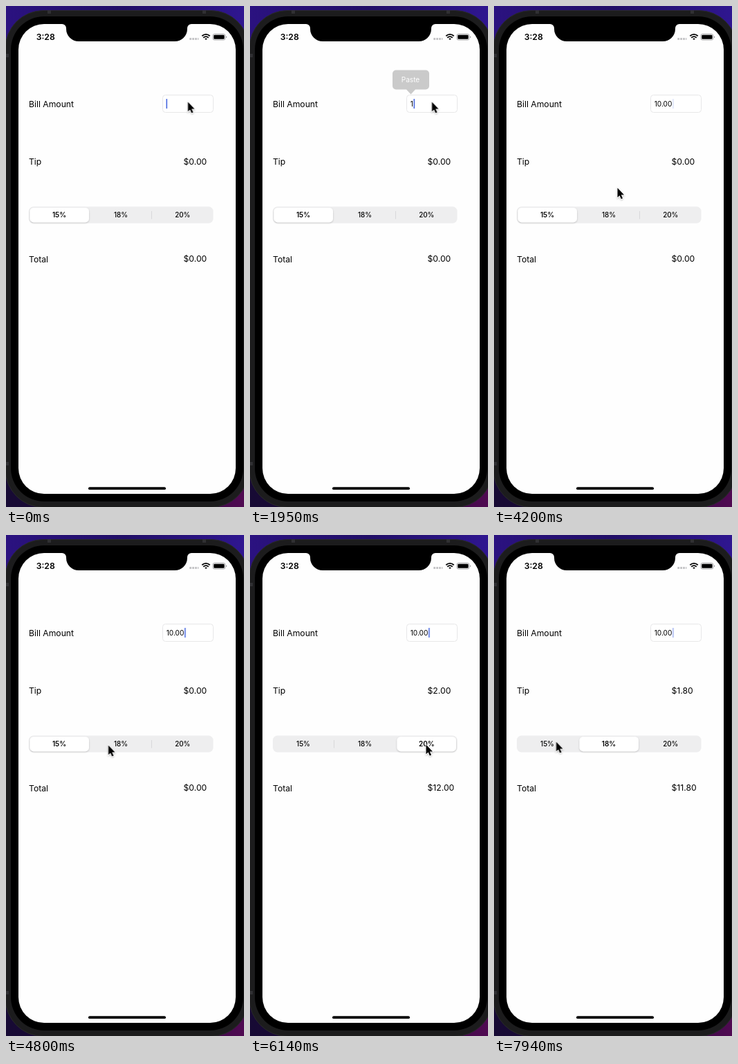
An HTML page for the animation above (8000 ms loop, 344 by 723 pixels).

```html
<!DOCTYPE html>
<html lang="en">
<head>
<meta charset="utf-8">
<title>Tip calculator</title>
<style>
html, body { margin: 0; width: 100%; height: 100%; overflow: hidden; background: #1a0d45; }
svg { display: block; width: 344px; height: 723px; }
text { font-family: Inter, Roboto, sans-serif; font-size: 12.2px; fill: #000; }
.clock { font-weight: 600; }
.small { font-size: 10.1px; }
.seg text { font-size: 9.9px; font-weight: 500; text-anchor: middle; }

/* Every track shares one 8 s loop; 1.875% is a 150 ms tick. */
.track, .seg text, .typed tspan { animation: 8s step-end infinite; }

.menu { animation-name: menu; }
@keyframes menu {
  0% { opacity: 0 } 7.5% { opacity: .35 } 9.375% { opacity: .8 } 11.25% { opacity: 1 }
  22.5% { opacity: .6 } 24.375% { opacity: .2 } 26.25%, 100% { opacity: 0 }
}

.typed .one { animation-name: one; }
.typed .zero { animation-name: zero; }
.typed .dot { animation-name: dot; }
.typed .dime { animation-name: dime; }
.typed .cent { animation-name: cent; }
@keyframes one { 0% { fill-opacity: 0 } 22.5%, 100% { fill-opacity: 1 } }
@keyframes zero { 0% { fill-opacity: 0 } 26.25%, 100% { fill-opacity: 1 } }
@keyframes dot { 0% { fill-opacity: 0 } 31.875%, 100% { fill-opacity: 1 } }
@keyframes dime { 0% { fill-opacity: 0 } 41.25%, 100% { fill-opacity: 1 } }
@keyframes cent { 0% { fill-opacity: 0 } 43.125%, 100% { fill-opacity: 1 } }

.caret { animation-name: caret; }
@keyframes caret {
  0% { transform: none }
  22.5% { transform: translateX(5px) }
  26.25% { transform: translateX(11px) }
  31.875% { transform: translateX(13.5px) }
  41.25% { transform: translateX(20px) }
  43.125%, 100% { transform: translateX(26.6px) }
}
.blink { animation-name: blink; }
@keyframes blink {
  0% { opacity: 1 } 7.5% { opacity: .3 } 9.375% { opacity: .5 } 11.25% { opacity: 1 }
  15% { opacity: .3 } 16.875% { opacity: 1 }
  31.875% { opacity: .6 } 33.75% { opacity: 1 }
  52.5% { opacity: .2 } 54.375% { opacity: 1 }
  65.625% { opacity: .2 } 67.5% { opacity: 1 }
  78.75% { opacity: .2 } 80.625% { opacity: 1 }
  91.75% { opacity: .3 } 93.625% { opacity: 1 }
  99.25%, 100% { opacity: .5 }
}

.none { animation-name: none-due; }
.mid { animation-name: mid-due; }
.high { animation-name: high-due; }
@keyframes none-due { 0% { opacity: 1 } 61.875%, 100% { opacity: 0 } }
@keyframes mid-due {
  0% { opacity: 0 } 61.875% { opacity: 1 } 69.375% { opacity: 0 } 84.25%, 100% { opacity: 1 }
}
@keyframes high-due { 0% { opacity: 0 } 69.375% { opacity: 1 } 84.25%, 100% { opacity: 0 } }

.thumb { animation-name: thumb; }
@keyframes thumb {
  0% { transform: none }
  61.875% { transform: translateX(28px) }
  63.75% { transform: translateX(82px) }
  65.625% { transform: translateX(89px) }
  69.375% { transform: translateX(109px) }
  71.25% { transform: translateX(169px) }
  73.125% { transform: translateX(178px) }
  84.25% { transform: translateX(117.5px) }
  86.125% { transform: translateX(92px) }
  88%, 100% { transform: translateX(89px) }
}
.seg .low-label { animation-name: low-label; }
.seg .mid-label { animation-name: mid-label; }
.seg .high-label { animation-name: high-label; }
@keyframes low-label { 0% { font-weight: 600 } 61.875%, 100% { font-weight: 500 } }
@keyframes mid-label {
  0% { font-weight: 500 } 61.875% { font-weight: 600 } 71.25% { font-weight: 500 } 84.25%, 100% { font-weight: 600 }
}
@keyframes high-label {
  0% { font-weight: 500 } 71.25% { font-weight: 600 } 84.25%, 100% { font-weight: 500 }
}
.left-rule { animation-name: left-rule; }
.right-rule { animation-name: right-rule; }
@keyframes left-rule {
  0% { opacity: 0 } 69.375% { opacity: .1 } 71.25% { opacity: .6 } 73.125% { opacity: 1 }
  84.25% { opacity: .6 } 86.125%, 100% { opacity: 0 }
}
@keyframes right-rule { 0% { opacity: 1 } 61.875% { opacity: .6 } 63.75%, 100% { opacity: 0 } }

.pointer { animation-name: pointer; }
@keyframes pointer {
  0% { transform: translate(262.5px, 138px) }
  48.75% { transform: translate(255px, 149px) }
  50.625% { transform: translate(224px, 196px) }
  52.5% { transform: translate(178px, 262px) }
  54.375% { transform: translate(141px, 304px) }
  56.25% { transform: translate(129px, 311px) }
  58.125% { transform: translate(137px, 308px) }
  60% { transform: translate(147.5px, 303px) }
  65.625% { transform: translate(183px, 303px) }
  67.5% { transform: translate(238px, 302px) }
  69.375% { transform: translate(257.5px, 302.5px) }
  75% { transform: translate(254px, 302px) }
  76.875% { transform: translate(238px, 299px) }
  78.75% { transform: translate(210px, 295px) }
  80.625% { transform: translate(184px, 292px) }
  82.375% { transform: translate(169.5px, 292px) }
  91.75% { transform: translate(160px, 294px) }
  93.625% { transform: translate(134px, 301px) }
  95.5% { transform: translate(107px, 304px) }
  97.375% { transform: translate(94px, 301px) }
  99.25%, 100% { transform: translate(89.5px, 298px) }
}
</style>
</head>
<body>
<svg viewBox="0 0 344 723">
  <defs>
    <linearGradient id="sky">
      <stop stop-color="#2b1280"/>
      <stop offset=".5" stop-color="#210e66"/>
      <stop offset="1" stop-color="#2f1690"/>
    </linearGradient>
    <linearGradient id="ground">
      <stop stop-color="#170a34"/>
      <stop offset=".6" stop-color="#1f0a38"/>
      <stop offset="1" stop-color="#500a52"/>
    </linearGradient>
    <filter id="lift" x="-10%" y="-20%" width="120%" height="150%">
      <feDropShadow dx="0" dy="1" stdDeviation="1" flood-opacity=".22"/>
    </filter>
    <filter id="drop" x="-30%" y="-20%" width="170%" height="150%">
      <feDropShadow dx="0" dy="1" stdDeviation=".8" flood-opacity=".3"/>
    </filter>
  </defs>

  <!-- wallpaper and phone -->
  <rect width="344" height="362" fill="url(#sky)"/>
  <rect y="361" width="344" height="362" fill="url(#ground)"/>
  <rect x="-1" y="6.5" width="352" height="717" rx="55" fill="#1c1c1d" stroke="#29292b"/>
  <g fill="#303033">
    <rect x="60" y="6" width="5" height="5"/>
    <rect x="284" y="6" width="5" height="5"/>
    <rect y="69" width="4" height="5"/>
    <rect y="658" width="4" height="5"/>
  </g>
  <rect x="7" y="15" width="336" height="700" rx="48"/>
  <rect x="18" y="26" width="314" height="678" rx="37" fill="#fefefe"/>
  <path d="M81 25V26A6 6 0 0 1 87 32V33A18 18 0 0 0 105 51H244A18 18 0 0 0 262 33V32A6 6 0 0 1 268 26V25Z"/>
  <rect x="119" y="694.300" width="112" height="3.800" rx="1.900"/>

  <!-- status bar -->
  <text class="clock" x="43.700" y="49">3:28</text>
  <path d="M265.300 47.500h13" stroke="#c4c4c6" stroke-width="2.800" stroke-dasharray="2.800 1.100"/>
  <g fill="none" stroke="#000" stroke-width="1.800">
    <path d="M283.300 43.300Q289 38.400 294.700 43.300M285.300 45.700Q289 42.500 292.700 45.700"/>
    <path d="M287.200 47.200Q289 45.800 290.800 47.200L289 49Z" fill="#000" stroke="none"/>
  </g>
  <rect x="298.900" y="40.400" width="18" height="8.700" rx="2.500" fill="none" stroke="#a0a0a2" stroke-width=".9"/>
  <rect x="300.200" y="41.700" width="15.400" height="6.100" rx="1.300"/>
  <path d="M318 43.400q1.300 .4 1.300 1.400t-1.300 1.400Z" fill="#a0a0a2"/>

  <!-- labels and results -->
  <text x="33" y="145.800">Bill Amount</text>
  <text x="33" y="229.200">Tip</text>
  <text x="33" y="369.800">Total</text>
  <g class="track none">
    <text x="256.500" y="229">$0.00</text>
    <text x="256.500" y="369.200">$0.00</text>
  </g>
  <g class="track mid">
    <text x="256.500" y="229">$1.80</text>
    <text x="256.500" y="369.200">$11.80</text>
  </g>
  <g class="track high">
    <text x="256.500" y="229">$2.00</text>
    <text x="256.500" y="369.200">$12.00</text>
  </g>

  <!-- bill field -->
  <rect x="226.500" y="128.500" width="73" height="25" rx="4" fill="#fff" stroke="#e7e7e8"/>
  <text class="small typed" x="231.700" y="144.800"><tspan class="one">1</tspan><tspan class="zero">0</tspan><tspan class="dot">.</tspan><tspan class="dime">0</tspan><tspan class="cent">0</tspan></text>
  <g class="track caret">
    <rect class="track blink" x="231.500" y="134" width="1.600" height="14" rx=".6" fill="#4868e0"/>
  </g>
  <g class="track menu">
    <path d="M211 92.500H254a5 5 0 0 1 5 5V115.500a5 5 0 0 1-5 5H239L232.500 127.500L226 120.500H211a5 5 0 0 1-5-5V97.500a5 5 0 0 1 5-5Z"/>
    <text class="small" x="218.700" y="110.300" style="fill:#fff">Paste</text>
  </g>

  <!-- tip rates -->
  <g class="seg">
    <rect x="33" y="289.500" width="266.500" height="24" rx="6.500" fill="#eeeeef"/>
    <rect class="track left-rule" x="121" y="296" width="1" height="11.500" fill="#d8d8da"/>
    <rect class="track right-rule" x="210" y="296" width="1" height="11.500" fill="#d8d8da"/>
    <g class="track thumb">
      <rect x="34.500" y="291" width="85.500" height="21.200" rx="5.500" fill="#fff" filter="url(#lift)"/>
    </g>
    <text class="low-label" x="77" y="305">15%</text>
    <text class="mid-label" x="166" y="305">18%</text>
    <text class="high-label" x="255.300" y="305">20%</text>
  </g>

  <g class="track pointer">
    <path d="M.5 .5V14.300L3.600 11.400L5.800 16.500L8 15.600L5.800 10.500H10Z" stroke="#fff" stroke-width="1.400" paint-order="stroke" filter="url(#drop)"/>
  </g>
</svg>
</body>
</html>
```
